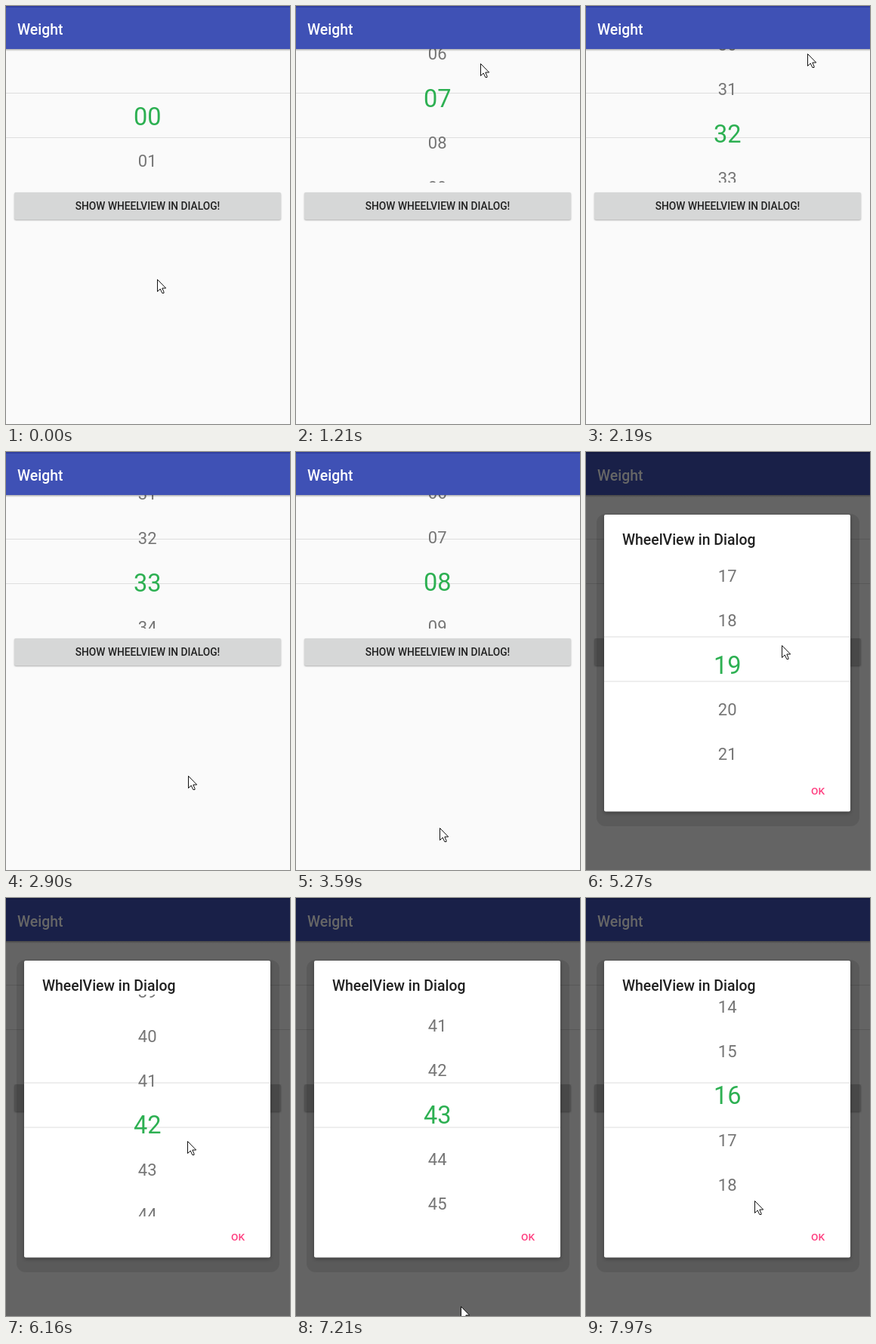
Recreate the animation shown at these times as an HTML page with a canvas. Size 376 px wide and 554 px high, loop 8 s.

```html
<!DOCTYPE html>
<html lang="en">
<head>
<meta charset="utf-8">
<title>Wheel picker</title>
<style>
html, body { margin: 0; height: 100%; overflow: hidden; background: #fafafa; }
canvas { display: block; }
</style>
</head>
<body>
<canvas id="stage" width="376" height="554"></canvas>
<script>
const ctx = document.getElementById('stage').getContext('2d');
const LOOP = 8000, STEP = 59, LAST = 50;
const PRESS = 4440, OPEN = 4640;
const BOOST = 1540, DECAY = 400; // fling strength and slow-down, in ms

const drag = (t0, t1, x0, y0, x1, y1) => ({ t0, t1, x0, y0, x1, y1 });
const rest = (t, x, y) => drag(t, t, x, y, x, y);

// The pointer glides between these; drags also turn the wheel
const pageMoves = [
  rest(0, 200, 363),
  rest(600, 226, 88),
  drag(880, 1130, 222, 205, 244, 0),
  drag(1680, 1950, 245, 200, 282, 0),
  drag(2600, 2990, 297, 84, 225, 531),
  rest(3590, 189, 502),
  drag(3950, 4130, 265, 75, 250, 300),
  rest(PRESS, 243, 268)
];
const dialogMoves = [
  drag(4842, 5050, 224, 304, 250, 35),
  drag(5450, 5690, 260, 278, 245, 108),
  drag(6400, 6660, 240, 330, 222, 122),
  drag(6860, 7210, 222, 122, 218, 542),
  rest(7970, 223, 401)
];
const moves = [...pageMoves, ...dialogMoves];

const clamp = (v, max = 1) => Math.max(0, Math.min(max, v));
const mix = (a, b, u) => a + (b - a) * u;

function pointerAt(t) {
  const i = moves.findLastIndex(m => t >= m.t0);
  const m = moves[i], next = moves[i + 1];
  if (t < m.t1) {
    const u = (t - m.t0) / (m.t1 - m.t0);
    return [mix(m.x0, m.x1, u), mix(m.y0, m.y1, u)];
  }
  if (!next) return [m.x1, m.y1];
  const u = 1 - (1 - (t - m.t1) / (next.t0 - m.t1)) ** 3;
  return [mix(m.x1, next.x0, u), mix(m.y1, next.y0, u)];
}

// Value at the wheel's centre: follow each drag, then coast until the next one
function wheelAt(t, list) {
  const drags = list.filter(m => m.t1 > m.t0);
  let pos = 0;
  drags.forEach((m, i) => {
    const span = m.t1 - m.t0, travel = (m.y0 - m.y1) / STEP;
    pos = clamp(pos + travel * clamp((t - m.t0) / span), LAST);
    const until = i + 1 < drags.length ? Math.min(t, drags[i + 1].t0) : t;
    const coast = Math.max(0, until - m.t1);
    pos = clamp(pos + BOOST * travel / span * (1 - Math.exp(-coast / DECAY)), LAST);
  });
  return pos;
}

function text(s, x, mid, size, color, weight = 400, align = 'center') {
  ctx.font = `${weight} ${size}px Roboto, sans-serif`;
  ctx.textAlign = align;
  ctx.fillStyle = color;
  ctx.fillText(s, x, mid + size * 0.3555);
}

function rect(x, y, w, h, color) {
  ctx.fillStyle = color;
  ctx.fillRect(x, y, w, h);
}

function card(x, y, w, h, r, color, blur = 0, drop = 0) {
  ctx.save();
  ctx.shadowColor = 'rgba(0,0,0,.3)';
  ctx.shadowBlur = blur;
  ctx.shadowOffsetY = drop;
  ctx.fillStyle = color;
  ctx.beginPath();
  ctx.roundRect(x, y, w, h, r);
  ctx.fill();
  ctx.restore();
}

function wheel(pos, mid, left, width, top, bottom) {
  rect(left, mid - 31, width, 1, '#dedede');
  rect(left, mid + 28, width, 1, '#dedede');
  ctx.save();
  ctx.beginPath();
  ctx.rect(left, top, width, bottom - top);
  ctx.clip();
  const near = Math.round(pos);
  for (let n = Math.max(0, near - 3); n <= Math.min(LAST, near + 3); n++) {
    const on = n === near;
    text(String(n).padStart(2, '0'), 187.2, mid + (n - pos) * STEP, on ? 32.5 : 22, on ? '#2db052' : '#757575');
  }
  ctx.restore();
}

function button(t) {
  card(11, 247, 353, 36, 2, '#d6d7d7', 2, 1);
  if (t > PRESS) {
    const p = clamp((t - PRESS) / 100);
    ctx.save();
    ctx.beginPath();
    ctx.roundRect(11, 247, 353, 36, 2);
    ctx.clip();
    rect(11, 247, 353, 36, `rgba(0,0,0,${0.06 * p})`);
    ctx.beginPath();
    ctx.arc(243, 268, 67 * p, 0, 7);
    ctx.fillStyle = 'rgba(0,0,0,.025)';
    ctx.fill();
    ctx.restore();
  }
  text('SHOW WHEELVIEW IN DIALOG!', 187.5, 265, 13.75, '#202020', 500);
}

function page(t) {
  rect(0, 0, 376, 554, '#fafafa');
  wheel(wheelAt(t, pageMoves), 146, 0, 376, 57, 234);
  button(t);
  const shade = ctx.createLinearGradient(0, 57, 0, 60);
  shade.addColorStop(0, 'rgba(0,0,0,.3)');
  shade.addColorStop(1, 'rgba(0,0,0,0)');
  rect(0, 57, 376, 3, shade);
  rect(0, 0, 376, 57, '#3f51b5');
  rect(0, 0, 376, 2, '#303f9f');
  text('Weight', 15, 31.1, 19.4, '#fff', 500, 'left');
}

function dialog(t) {
  const p = clamp((t - OPEN) / 160);
  if (!p) return;
  rect(0, 0, 376, 554, `rgba(0,0,0,${0.6 * p})`);
  ctx.save();
  ctx.globalAlpha = p;
  card(14, 82, 348, 414, 12, 'rgba(0,0,0,.1)');
  card(24, 83, 326, 393.5, 2, '#fff', 5, 2);
  wheel(wheelAt(t, dialogMoves), 275.5, 24, 326, 128, 422);
  text('WheelView in Dialog', 48, 116, 19.4, '#212121', 500, 'left');
  text('OK', 307, 449.4, 13.6, '#ff4081', 500);
  ctx.restore();
}

const tip = new Path2D('M0 0V16L3.7 12.5 6.3 18H8.5V16.5L6.3 11.5H11.2Z');

function arrow(x, y) {
  ctx.save();
  ctx.translate(Math.round(x) + 0.5, Math.round(y) + 0.5);
  ctx.fillStyle = '#fff';
  ctx.fill(tip);
  ctx.strokeStyle = '#111';
  ctx.stroke(tip);
  ctx.restore();
}

function draw(now) {
  const t = Math.max(0, now) % LOOP;
  page(t);
  dialog(t);
  arrow(...pointerAt(t));
  requestAnimationFrame(draw);
}
requestAnimationFrame(draw);
</script>
</body>
</html>
```
